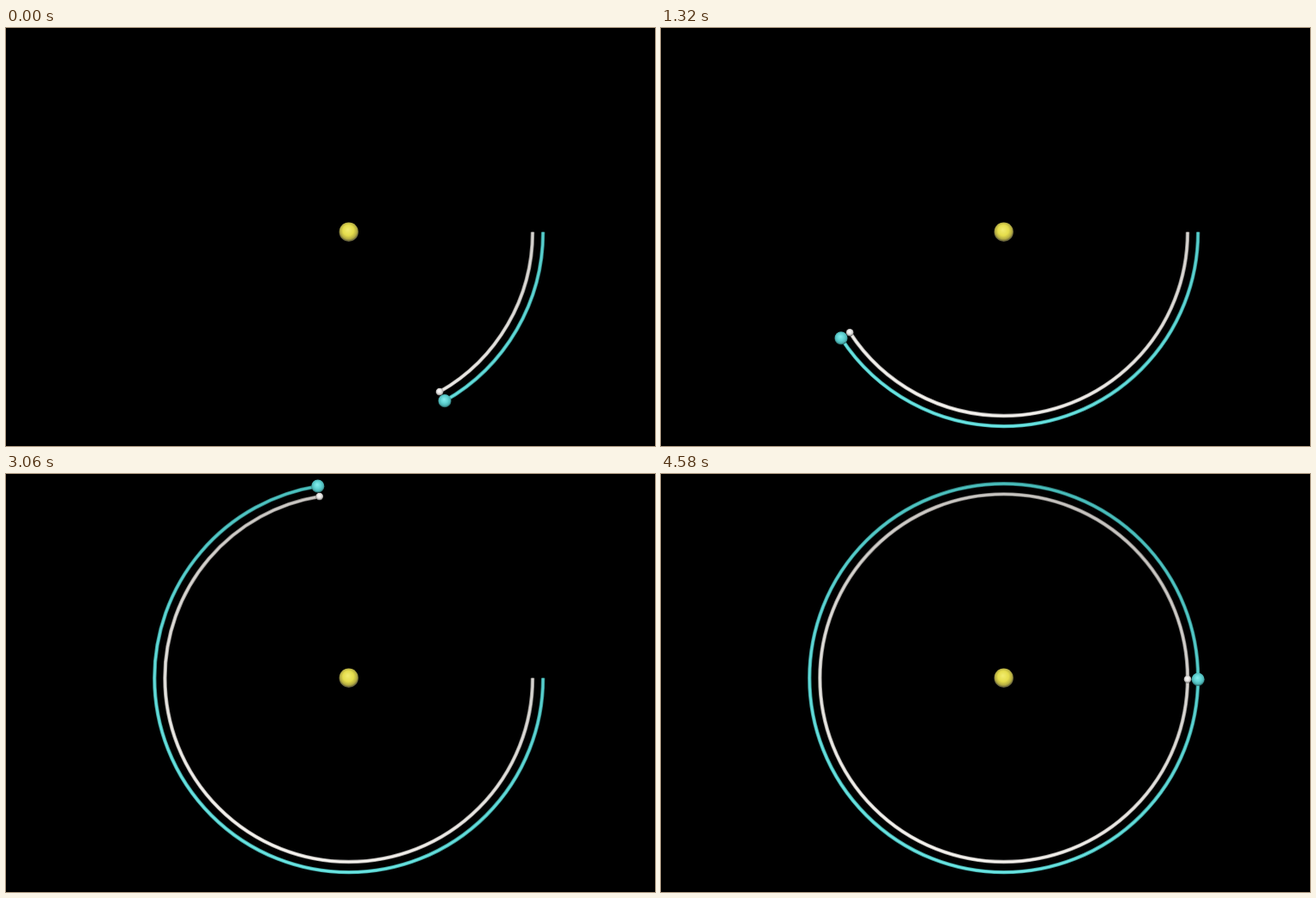
These frames come from a looping animation (753x485 px, 4680 ms). An HTML page with a canvas:

```html
<!DOCTYPE html>
<html lang="en">
<head>
<meta charset="utf-8">
<title>Two orbits</title>
<style>
  html, body { margin: 0; height: 100%; overflow: hidden; background: #000; }
  canvas { display: block; }
</style>
</head>
<body>
<canvas id="stage" width="753" height="485"></canvas>
<script>
const ctx = document.getElementById("stage").getContext("2d");
const CX = 397.7, CY = 236.7;
const LOOP = 4680, SWEEP = 4580, STEP = 20;
const START = 60.4, END = 360.4;

const planet = {
  orbit: 225.4, size: 7.6,
  trail: ["#68e4e2", "#5cd4d2", "#48bcba"], edge: ["#3fa09f", "#338b8a", "#297372"],
  ball: ["#86eeee", "#60d2d2", "#4db4b4", "#1f5454"]
};
const moon = {
  orbit: 213.3, size: 4.4,
  trail: ["#f6f4f0", "#dcd9d5", "#c4c1bd"], edge: ["#aaa8a5", "#93918e", "#777572"],
  ball: ["#ffffff", "#e6e4e2", "#b8b6b4", "#484848"]
};
const sunColors = ["#f2ec70", "#e5dd4c", "#b5ad42", "#4b4836"];

// Light comes from below for the tubes, slightly from the left.
function tubeGradient(colors) {
  const g = ctx.createLinearGradient(CX - 70, CY + 215, CX + 70, CY - 215);
  colors.forEach((c, i) => g.addColorStop(i / (colors.length - 1), c));
  return g;
}

function drawTrail(body, angle) {
  ctx.beginPath();
  ctx.arc(CX, CY, body.orbit, 0, Math.min(angle, 2 * Math.PI));
  ctx.lineWidth = 4.4;
  ctx.strokeStyle = body.edgeFill;
  ctx.stroke();
  ctx.lineWidth = 2.7;
  ctx.strokeStyle = body.trailFill;
  ctx.stroke();
}

function drawBall(x, y, r, colors) {
  const g = ctx.createRadialGradient(x - r * 0.1, y - r * 0.25, 0, x, y - r * 0.1, r * 1.1);
  [0, 0.5, 0.78, 1].forEach((stop, i) => g.addColorStop(stop, colors[i]));
  ctx.fillStyle = g;
  ctx.beginPath();
  ctx.arc(x, y, r, 0, 2 * Math.PI);
  ctx.fill();
}

for (const body of [moon, planet]) {
  body.trailFill = tubeGradient(body.trail);
  body.edgeFill = tubeGradient(body.edge);
}

function draw(now) {
  const t = Math.min(Math.floor((now % LOOP) / STEP) * STEP, SWEEP);
  const angle = (START + (END - START) * t / SWEEP) * Math.PI / 180;
  ctx.fillStyle = "#000";
  ctx.fillRect(0, 0, 753, 485);
  drawBall(CX, CY, 11.2, sunColors);
  for (const body of [moon, planet]) drawTrail(body, angle);
  for (const body of [moon, planet]) {
    drawBall(CX + body.orbit * Math.cos(angle), CY + body.orbit * Math.sin(angle), body.size, body.ball);
  }
  requestAnimationFrame(draw);
}

draw(0);
</script>
</body>
</html>
```
